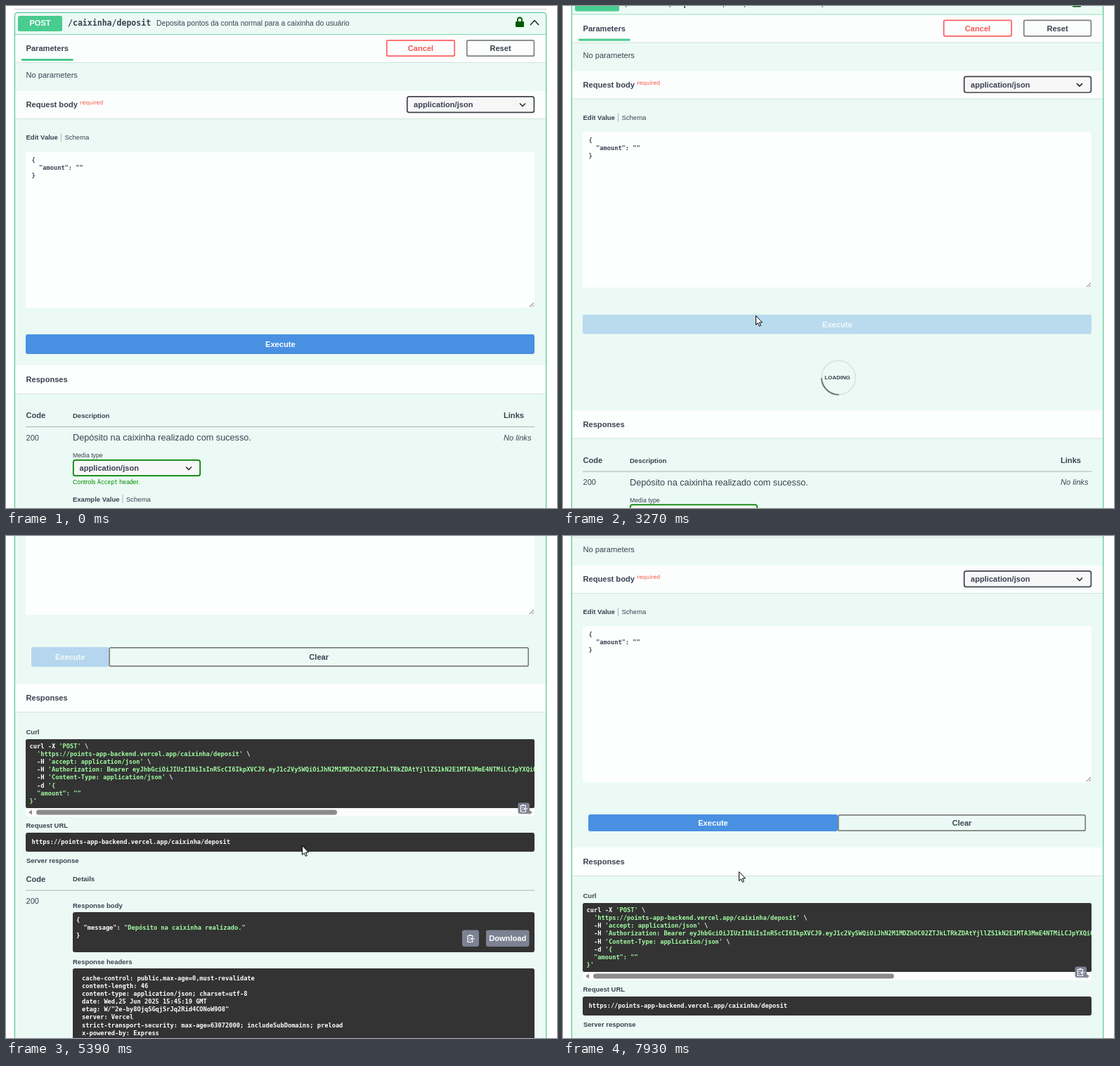
Write an HTML page that moves like this. It is 784x714 px and loops after 8 s.

```html
<!DOCTYPE html>
<html lang="pt">
<head>
<meta charset="utf-8">
<title>POST /caixinha/deposit</title>
<style>
html, body { margin: 0; width: 100%; height: 100%; overflow: hidden; background: #fff; }
svg { display: block; }
text { font: 11.1px "Liberation Sans", Arial, sans-serif; fill: #3b4151; white-space: pre; }
.b { font-weight: 700; }
.i { font-style: italic; }
.m { text-anchor: middle; }
.w { fill: #fff; }
.t12 { font-size: 9.5px; }
.t13 { font-size: 10.3px; }
.t16 { font-size: 12.7px; }
.t11 { font-size: 8.72px; }
.t10 { font-size: 7.93px; }
.code, .code text, .mono { font: 700 8.7px "DejaVu Sans Mono", monospace; }
.code text { fill: #fff; }
.code tspan, .code .s { fill: #a2fca2; }
.card { fill: #ebfaf4; stroke: #49cc90; filter: drop-shadow(0 0 1.2px rgba(0,0,0,.19)); }
.sec { fill: #fff; fill-opacity: .85; }
.edge { stroke: #d3e4dc; }
.rule { stroke: #a9b6b5; }
.dark { fill: #333; }
.box { fill: #f7f7f7; stroke: #41444e; stroke-width: 1.7; }
.out { fill: none; stroke: gray; stroke-width: 1.7; }
.btn { fill: #7d8293; }
.blue { fill: #4990e2; }
.line { fill: none; stroke: #222; stroke-width: 1.5; }

/* 1% of the loop is 80 ms */
.k { animation: 8s infinite; }
.step { animation: 8s step-end infinite; }
#page { animation-name: scroll; }
#docs { animation-name: docs; }
#send { animation-name: disable; }
#result { animation-name: shrink; }
#go { animation-name: enable; }
#goBox { animation-name: goBox; }
#goText { animation-name: goText; }
#clearBox { animation-name: clearBox; }
#clearText { animation-name: clearText; }
#cursor { animation-name: move; }
#arrow { animation-name: arrow; }
#hand { animation-name: hover; }
#press { animation-name: press; }
#hover { animation-name: hover; filter: drop-shadow(0 0 2.5px rgba(0,0,0,.45)); }
.before { animation-name: before; }
.after { animation-name: after; }
#loading { animation-name: loading; }
#spin { transform-origin: 392px 557px; animation: spin 1s -350ms linear infinite; }

@keyframes scroll {
  0%, 40% { transform: none; animation-timing-function: ease-in; }
  40.875% { transform: translateY(-28px); animation-timing-function: linear; }
  49.625% { transform: translateY(-302px); animation-timing-function: ease-out; }
  51%, 80.375% { transform: translateY(-317px); animation-timing-function: ease-in; }
  81.375% { transform: translateY(-348px); animation-timing-function: ease-out; }
  83.125%, 91.75% { transform: translateY(-396px); animation-timing-function: ease-in-out; }
  95.75%, to { transform: translateY(-79px); }
}
@keyframes docs { 0% { transform: none; } 33%, to { transform: translateY(92px); } }
@keyframes disable { 0%, 33% { opacity: 1; } 36.75%, to { opacity: .3; } }
@keyframes shrink { 0%, 67.375% { transform: translateY(5px); } 71%, to { transform: none; } }
@keyframes enable { 0%, 67.375% { opacity: .33; } 71%, to { opacity: 1; } }
@keyframes goBox { 0%, 67.375% { width: 110px; height: 28px; } 71%, to { width: 355px; height: 24px; } }
@keyframes goText { 0%, 67.375% { transform: translate(91px, 493px); } 71%, to { transform: translate(213.5px, 491px); } }
@keyframes clearBox {
  0%, 67.375% { x: 146.8px; width: 596.4px; height: 26.4px; }
  71%, to { x: 391.8px; width: 351.4px; height: 22.4px; }
}
@keyframes clearText { 0%, 67.375% { transform: translate(445px, 493px); } 71%, to { transform: translate(567.5px, 491px); } }
@keyframes before { 0% { visibility: visible; } 67%, to { visibility: hidden; } }
@keyframes after { 0% { visibility: hidden; } 67%, to { visibility: visible; } }
@keyframes loading { 0% { visibility: hidden; } 33% { visibility: visible; } 67%, to { visibility: hidden; } }
@keyframes hover { 0% { visibility: hidden; } 26.9% { visibility: visible; } 33%, to { visibility: hidden; } }
@keyframes press { 0% { visibility: hidden; } 28.75% { visibility: visible; } 32.25%, to { visibility: hidden; } }
@keyframes arrow {
  0% { visibility: hidden; }
  4.1% { visibility: visible; }
  26.9% { visibility: hidden; }
  33%, to { visibility: visible; }
}
@keyframes spin { to { transform: rotate(360deg); } }
@keyframes move {
  0%, 4.1% { transform: translate(687px, 697px); animation-timing-function: ease-out; }
  7.5%, 16.2% { transform: translate(461px, 312px); }
  18.5% { transform: translate(499px, 335px); animation-timing-function: ease-in; }
  22% { transform: translate(420px, 420px); animation-timing-function: ease-out; }
  26.25% { transform: translate(308px, 468px); }
  27.5%, 35% { transform: translate(311px, 475px); }
  39.5%, 57% { transform: translate(274px, 440px); animation-timing-function: ease-in; }
  60% { transform: translate(340px, 447px); animation-timing-function: linear; }
  62.5% { transform: translate(416px, 445px); }
  63.25%, 73.2% { transform: translate(421px, 440px); }
  80%, 98.2% { transform: translate(258px, 484px); }
  99%, to { transform: translate(250px, 477px); }
}
</style>
</head>
<body>
<svg width="784" height="714" viewBox="0 0 784 714">
<defs>
  <path id="chev" class="line" d="M-4-2 0 2 4-2"/>
  <g id="clip" fill="none" stroke="#fff" stroke-width="1.2">
    <path d="M3-2V-4H-4V5H3V3M-2-5H1M-2-1H0M-2 2H0M6 .5H1M3-1.5 1 .5 3 2.5"/>
  </g>
  <clipPath id="curl"><rect x="28" y="252" width="724" height="98"/></clipPath>
</defs>

<g id="page" class="k">
  <path d="M12 4.5H769" stroke="#c9ccd0"/>
  <rect class="card" x="12.5" y="9.5" width="756" height="1400" rx="3.5"/>
  <rect x="17" y="14" width="63" height="22" rx="2.5" fill="#49cc90"/>
  <text class="b m w" x="48.5" y="28">POST</text>
  <text class="mono" style="font-size:11.55px" x="88" y="28">/caixinha/deposit</text>
  <text class="t13" x="214" y="28">Deposita pontos da conta normal para a caixinha do usuário</text>
  <rect x="725" y="22" width="12" height="8" rx="1" fill="#005a00"/>
  <path d="M728 23V19.5a3 3 0 0 1 6 0V23" fill="none" stroke="#005a00" stroke-width="1.8"/>
  <path class="line" d="M746 27 752 20.5 758 27"/>
  <path d="M13 40.5H768" stroke="#7fd9b0"/>

  <rect class="sec" x="13" y="41" width="755" height="39"/>
  <path class="edge" d="M13 80.5H768"/>
  <text class="b" x="28.5" y="64">Parameters</text>
  <rect x="22" y="75" width="73.5" height="3" fill="#49cc90"/>
  <rect class="out" style="stroke:#ff6060" x="541.8" y="48.8" width="96.4" height="22.4" rx="2"/>
  <text class="b m" style="fill:#f55" x="590" y="64">Cancel</text>
  <rect class="out" x="655.8" y="48.8" width="95.6" height="22.4" rx="2"/>
  <text class="b m" x="703.5" y="64">Reset</text>
  <text x="28.5" y="102">No parameters</text>

  <rect class="sec" x="13" y="121" width="755" height="39"/>
  <path class="edge" d="M13 160.5H768"/>
  <text class="b" x="28.5" y="144">Request body</text>
  <text style="font:7.8px 'DejaVu Sans',sans-serif;fill:#f4523f" x="105.5" y="140">required</text>
  <rect class="box" x="570.8" y="128.8" width="180.6" height="22.6" rx="3"/>
  <text class="b" x="580" y="144">application/json</text>
  <use href="#chev" x="735" y="140.5"/>

  <text class="b t12" x="28.5" y="190">Edit Value</text>
  <path class="rule" d="M78.5 181V193"/>
  <text class="t12" x="83.5" y="190">Schema</text>
  <rect x="28" y="207" width="724" height="222" rx="2" fill="#fdfefe"/>
  <text class="mono" x="36.5" y="222">{</text>
  <text class="mono" x="47" y="233">"amount": ""</text>
  <text class="mono" x="36.5" y="244">}</text>
  <path d="M745 428 751 422M748.5 428 751 425.5" stroke="#666"/>

  <g class="step before">
    <rect id="hover" class="blue step" x="28" y="467" width="724" height="28" rx="3"/>
    <g id="send" class="k">
      <rect class="blue" x="28" y="467" width="724" height="28" rx="3"/>
      <text class="b m w" x="390.3" y="485">Execute</text>
    </g>
  </g>

  <g id="loading" class="step">
    <circle cx="392" cy="557" r="24.2" fill="none" stroke="#555" stroke-opacity=".13" stroke-width="1.7"/>
    <path id="spin" d="M374.9 539.9A24.2 24.2 0 0 1 409.1 539.9" fill="none" stroke="#000" stroke-opacity=".58" stroke-width="1.7"/>
    <text class="b m t10" x="390.5" y="559">LOADING</text>
  </g>

  <g class="step before">
  <g id="docs" class="step">
    <rect class="sec" x="13" y="511" width="755" height="40"/>
    <path class="edge" d="M13 551.5H768"/>
    <text class="b" x="28.5" y="535">Responses</text>
    <text class="b" x="28.5" y="586">Code</text>
    <text class="b t12" x="95" y="586">Description</text>
    <text class="b" x="708" y="586">Links</text>
    <path class="rule" d="M28 598.5H752"/>

    <text x="28.5" y="617.5">200</text>
    <text class="t16" x="95" y="618">Depósito na caixinha realizado com sucesso.</text>
    <text class="i" x="708" y="617.5">No links</text>
    <text class="t11" x="95" y="642">Media type</text>
    <rect class="box" style="stroke:#008000" x="95.8" y="645.8" width="180.4" height="22.4" rx="3"/>
    <text class="b" x="104.5" y="661">application/json</text>
    <use href="#chev" x="260" y="657.5"/>
    <text class="t11" style="fill:#080" x="95" y="680">Controls <tspan style="font:8px 'DejaVu Sans Mono',monospace">Accept</tspan> header.</text>
    <text class="b t12" x="95" y="704.5">Example Value</text>
    <path class="rule" d="M166 695V707"/>
    <text class="t12" x="171" y="704.5">Schema</text>
    <rect class="dark" x="95" y="721" width="591" height="56" rx="3"/>
    <g class="code">
      <text x="100" y="734">{</text>
      <text x="110.5" y="745">"message": <tspan>"Depósito na caixinha realizado."</tspan></text>
      <text x="100" y="756">}</text>
    </g>

    <text x="28.5" y="796">400</text>
    <text class="t16" x="95" y="796">Saldo insuficiente ou requisição inválida.</text>
    <text class="i" x="708" y="796">No links</text>
    <text class="t11" x="95" y="820">Media type</text>
    <rect class="box" x="95.8" y="824.3" width="180.4" height="22.2" rx="3"/>
    <text class="b" x="104.5" y="839">application/json</text>
    <use href="#chev" x="260" y="835.5"/>
    <text class="t11" x="290" y="820">Examples</text>
    <rect class="box" x="290.8" y="824.3" width="180.4" height="22.2" rx="3"/>
    <text class="b" x="299.8" y="839">Saldo insuficiente</text>
    <use href="#chev" x="454.5" y="835.5"/>
    <text class="b t12" x="95" y="878">Example Value</text>
    <path class="rule" d="M166 868V880"/>
    <text class="t12" x="171" y="878">Schema</text>
    <rect class="dark" x="95" y="894" width="591" height="56" rx="3"/>
    <g class="code">
      <text x="100" y="907">{</text>
      <text x="110.5" y="918">"error": <tspan>"Saldo insuficiente"</tspan></text>
      <text x="100" y="929">}</text>
    </g>
  </g>
  </g>

  <g class="step after">
    <g id="go" class="k">
      <rect id="goBox" class="blue k" x="36" y="475" rx="3"/>
      <text id="goText" class="b m w k">Execute</text>
    </g>
    <rect id="clearBox" class="out k" y="475.8" rx="2"/>
    <text id="clearText" class="b m k">Clear</text>

    <g id="result" class="k">
    <g transform="translate(0 349)">
      <rect class="sec" x="13" y="173" width="755" height="40"/>
      <path class="edge" d="M13 213.5H768"/>
      <text class="b" x="28.5" y="197">Responses</text>

      <text class="b t12" x="28.5" y="245">Curl</text>
      <rect x="28" y="346" width="724" height="16" fill="#fcfcfc"/>
      <rect class="dark" x="28" y="252" width="724" height="98" rx="2.5"/>
      <g class="code" clip-path="url(#curl)">
        <text x="33.5" y="265">curl -X <tspan>'POST'</tspan> \</text>
        <text x="44" y="276.2"><tspan>'https://points-app-backend.vercel.app/caixinha/deposit'</tspan> \</text>
        <text x="44" y="287.3">-H <tspan>'accept: application/json'</tspan> \</text>
        <text x="44" y="298.4">-H <tspan>'Authorization: Bearer eyJhbGciOiJIUzI1NiIsInR5cCI6IkpXVCJ9.eyJ1c2VySWQiOiJhN2M1MDZhOC02ZTJkLTRkZDAtYjllZS1kN2E1MTA3MmE4NTMiLCJpYXQiO</tspan></text>
        <text x="44" y="309.5">-H <tspan>'Content-Type: application/json'</tspan> \</text>
        <text x="44" y="320.6">-d <tspan>'{</tspan></text>
        <text class="s" x="44" y="331.7">"amount": ""</text>
        <text class="s" x="33.5" y="342.8">}'</text>
      </g>
      <rect x="43" y="352.5" width="428" height="7" rx="3.5" fill="#8b8b8b"/>
      <path d="M37 352.5V359.5L32 356ZM744 352.5V359.5L749 356Z" fill="#8b8b8b"/>
      <rect class="btn" x="728.5" y="342.5" width="16.5" height="15.5" rx="3"/>
      <use href="#clip" x="736.5" y="350.5"/>

      <text class="b t12" x="28.5" y="378">Request URL</text>
      <rect class="dark" x="28" y="385" width="724" height="27" rx="3"/>
      <g class="code"><text x="36.5" y="401">https://points-app-backend.vercel.app/caixinha/deposit</text></g>
      <text class="b t12" x="29" y="428">Server response</text>
      <text class="b" x="28.5" y="455">Code</text>
      <text class="b t12" x="95" y="454">Details</text>
      <path class="rule" d="M28 467H752"/>

      <text x="28.5" y="486">200</text>
      <text class="b t12" x="95" y="492">Response body</text>
      <rect class="dark" x="95" y="498" width="657" height="57" rx="3"/>
      <g class="code">
        <text x="100" y="512">{</text>
        <text x="110.5" y="523">"message": <tspan>"Depósito na caixinha realizado."</tspan></text>
        <text x="100" y="534">}</text>
      </g>
      <rect class="btn" x="649" y="523.5" width="24" height="23.5" rx="3"/>
      <use href="#clip" x="661" y="535.5"/>
      <rect class="btn" x="683" y="523.5" width="61.5" height="23.5" rx="3"/>
      <text class="b m w" x="713.7" y="539">Download</text>

      <text class="b t12" x="95" y="572">Response headers</text>
      <rect class="dark" x="95" y="578" width="657" height="127" rx="3"/>
      <g class="code">
        <text x="108" y="595">cache-control: public,max-age=0,must-revalidate</text>
        <text x="108" y="606.1">content-length: 46</text>
        <text x="108" y="617.2">content-type: application/json; charset=utf-8</text>
        <text x="108" y="628.3">date: Wed,25 Jun 2025 15:45:19 GMT</text>
        <text x="108" y="639.4">etag: W/"2e-by8OjqSGqjSrJq2Rid4CONoW9O8"</text>
        <text x="108" y="650.5">server: Vercel</text>
        <text x="108" y="661.6">strict-transport-security: max-age=63072000; includeSubDomains; preload</text>
        <text x="108" y="672.7">x-powered-by: Express</text>
        <text x="108" y="683.8">x-vercel-cache: MISS</text>
        <text x="108" y="694.9">x-vercel-id: gru1::iad1::7fr6v-1750866316623-58ee6165a759</text>
      </g>
    </g>
    </g>
  </g>
</g>

<g id="cursor" class="k" stroke="#000" fill="#fff" stroke-linejoin="round">
  <circle id="press" class="step" cy="1" r="10" fill="#e0e000" fill-opacity=".6" stroke="none"/>
  <path id="arrow" class="step" d="M.5.5V13.5L3.3 10.8 5.4 15.4 7.4 14.5 5.4 10H9.5Z"/>
  <path id="hand" class="step" d="M-1.5 9V1.5a1.5 1.5 0 0 1 3 0V6a1.4 1.4 0 0 1 2.7 0V7a1.4 1.4 0 0 1 2.6.2V8a1.3 1.3 0 0 1 2.4.6V12L7.5 15.5V17.5H.2V16L-4.4 10.5C-5 9-3.2 8-1.5 10.5Z"/>
</g>
</svg>
</body>
</html>
```
